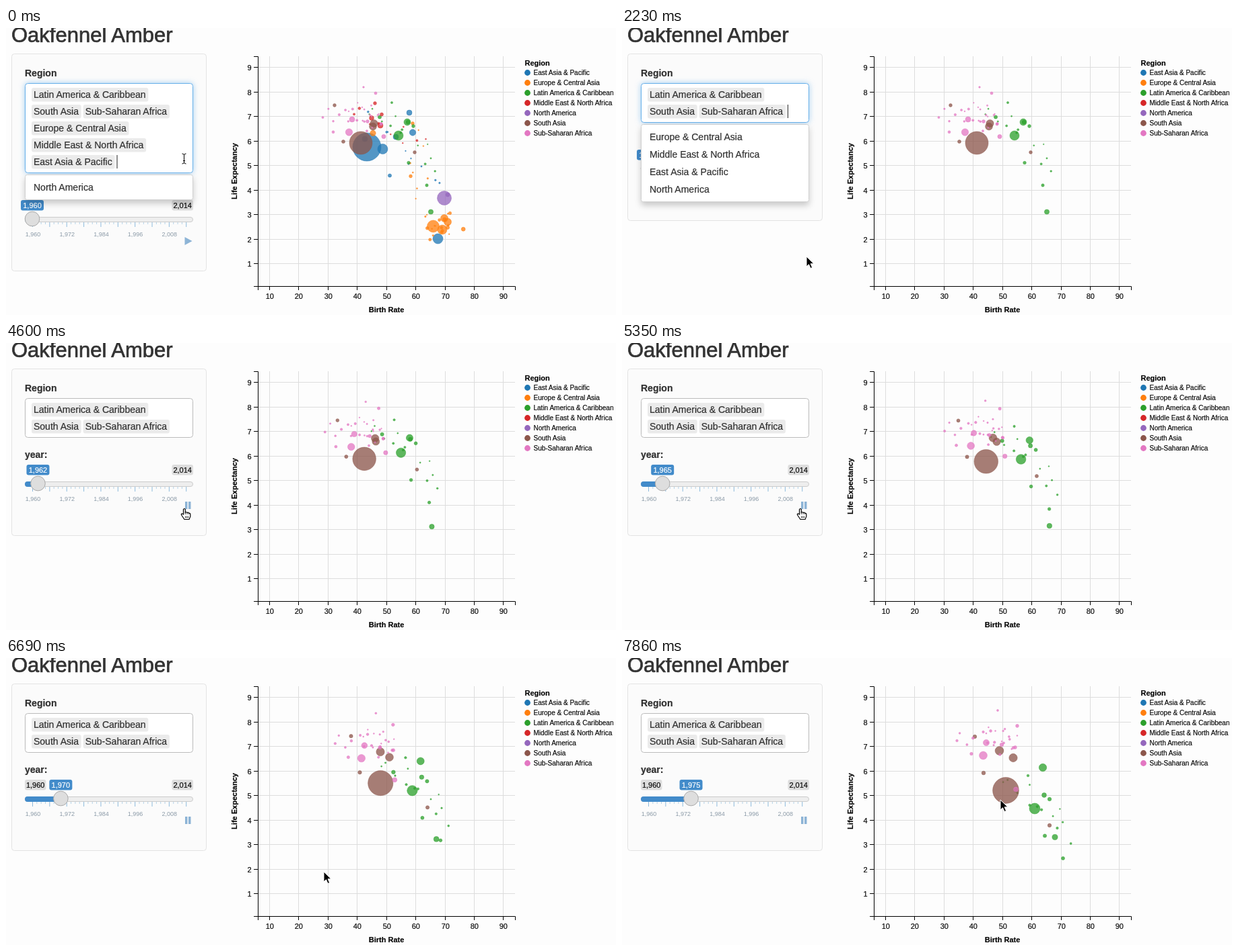
Recreate the animation shown at these times as an HTML page. Size 906x427 px, loop 8000 ms.

```html
<!DOCTYPE html>
<html lang="en">
<head>
<meta charset="utf-8">
<title>Bubble chart</title>
<style>
  html, body { margin: 0; width: 100%; height: 100%; overflow: hidden; background: #fdfdfd; }
  svg { display: block; width: 100%; height: 100%; }
  text { font-family: "Liberation Sans", Arial, Helvetica, sans-serif; stroke: #222; stroke-width: .2; }
  .title { font-size: 31px; fill: #333; stroke: #333; stroke-width: .7; }
  .b { font-weight: bold; }
  .ui { font-size: 14px; fill: #333; }
  .small { font-size: 11px; }
  .legend { font-size: 10px; }
  .year { font-size: 9px; fill: #8c9ba8; stroke: none; }
  .light { fill: #fff; stroke: #fff; }
  .mid { text-anchor: middle; }
  .end { text-anchor: end; }
  .focus { filter: drop-shadow(0 0 4px rgba(102, 175, 233, .6)); }
  .menu { filter: drop-shadow(0 5px 5px rgba(0, 0, 0, .2)); }
  #dots { opacity: 1; fill-opacity: .76; stroke-opacity: .76; stroke-width: .6; }
</style>
</head>
<body>
<svg viewBox="0 0 906 427" preserveAspectRatio="none">
  <g id="plot"></g>
  <g id="dots"></g>
  <text x="8" y="21" class="title">Oakfennel Amber</text>
  <g id="panel"></g>
  <g id="pointer"></g>
</svg>
<script>
const LOOP = 8000, STEP = 148.3, LAST = 53;
const PLAY = 28;                       // step at which the years start to run

// ---------- helpers ----------
const $ = id => document.getElementById(id);
const range = n => [...Array(n).keys()];
const comma = n => n.toLocaleString('en-US');
const rect = (x, y, w, h, fill, rx = 0, more = '') =>
  `<rect x="${x}" y="${y}" width="${w}" height="${h}" rx="${rx}" fill="${fill}" ${more}/>`;
const text = (x, y, s, cls = '', more = '') =>
  `<text x="${x}" y="${y}" class="${cls}" ${more}>${s.replace('&', '&amp;')}</text>`;
const line = (x1, y1, x2, y2, color) =>
  `<path d="M${x1} ${y1}L${x2} ${y2}" stroke="${color}"/>`;
const circle = (x, y, r, more = '') =>
  `<circle cx="${x.toFixed(2)}" cy="${y.toFixed(2)}" r="${r.toFixed(2)}" ${more}/>`;

const pen = document.createElement('canvas').getContext('2d');
pen.font = '14px "Liberation Sans", Arial, Helvetica, sans-serif';

function seeded(seed) {
  return () => {
    seed = (seed * 16807) % 2147483647;
    return seed / 2147483647;
  };
}

// ---------- bubbles ----------
// big: radius, x, y and, where it differs from the region, its own drift
// clouds: count, line from x, y to x, y, spread, largest radius
// gone: step at which the region has left the chart
const regions = [
  { name: 'East Asia & Pacific', color: '#1f77b4', gone: 3,
    big: [[21, 536, 177], [7.5, 559.5, 180], [7.5, 641.5, 313.5], [4, 599, 126], [4.7, 604, 155.5],
          [4, 579, 162], [2.6, 570, 219.5], [4, 533, 165]],
    clouds: [[9, 540, 140, 656, 240, 14, 1.6]] },
  { name: 'Europe & Central Asia', color: '#ff7f0e', gone: 11,
    big: [[9, 634.5, 295], [7, 648, 300], [5.5, 656, 288.5], [5.5, 651, 283], [4.2, 545, 156.5],
          [2.4, 601, 220.5], [2.4, 604, 142]],
    clouds: [[18, 632, 300, 664, 284, 17, 3.2], [8, 610, 150, 620, 275, 14, 1.3]] },
  { name: 'Latin America & Caribbean', color: '#2ca02c', drift: [30, 64],
    big: [[7, 583, 160], [5, 596, 140, 29, 23], [3.6, 631, 273.5, 12, -7], [3, 597, 140],
          [2.3, 598, 200.5], [2.2, 625, 234], [2.4, 605, 146], [2.6, 555, 132.5], [1.6, 573, 111]],
    clouds: [[12, 540, 125, 645, 205, 15, 1.6]] },
  { name: 'Middle East & North Africa', color: '#d62728', gone: 5,
    big: [[3.4, 543, 134], [4, 556, 145], [2.5, 558, 128.5], [2.4, 548, 112]],
    clouds: [[9, 510, 118, 625, 175, 14, 2]] },
  { name: 'North America', color: '#9467bd', gone: 2,
    big: [[10.5, 651, 253], [3, 656, 248]] },
  { name: 'South Asia', color: '#8c564b', drift: [36, 2],
    big: [[17, 527, 171, 43, 26], [5.6, 546.5, 142, 14, -4], [5.4, 545, 146.5], [2.5, 501, 169],
          [2.4, 488, 115], [2.4, 607, 185, 28, 64]] },
  { name: 'Sub-Saharan Africa', color: '#e377c2', drift: [27, -10],
    big: [[4, 514, 136], [5.2, 509.5, 155], [3.1, 561, 161.5, 24, 34], [2.4, 537, 139],
          [2.1, 549, 97, 38, 4], [2.1, 557, 143], [1.6, 470.5, 133], [1.3, 531, 88]],
    clouds: [[22, 490, 140, 555, 130, 23, 2]] }
];

regions.forEach((region, i) => {
  const rnd = seeded(4211 + 97 * i), { drift = [0, 0], big, clouds = [] } = region;
  const spread = s => (rnd() + rnd() - 1) * s * 1.3;
  const small = clouds.flatMap(([n, x1, y1, x2, y2, s, top]) => range(n).map(j => {
    const f = (j + rnd()) / n, pace = 0.7 + 0.6 * rnd();
    return [0.8 + (top - 0.8) * rnd() ** 1.5, x1 + (x2 - x1) * f + spread(s),
            y1 + (y2 - y1) * f + spread(s), ...drift.map(d => d * pace)];
  }));
  region.dots = [...small, ...big.map(d => d.length > 3 ? d : [...d, ...drift])];
});

function drawDots(k) {
  const p = Math.max(0, (k - PLAY) / (LAST - PLAY));
  return regions.map(({ color, dots, gone = Infinity }) => {
    if (k >= gone) return '';
    const fading = k === gone - 1 && k < 10;
    return `<g fill="${color}" stroke="${color}" opacity="${fading ? 0.4 : 1}">` +
      dots.map(([r, x, y, dx, dy]) =>
        circle(x + dx * p, y + dy * p ** 1.4, r * (1 + 0.14 * p))).join('') + '</g>';
  }).join('');
}

// ---------- axes and legend ----------
function drawPlot() {
  const ticks = range(9);
  const xs = ticks.map(i => Math.round(391 + 43.43 * i) + 0.5);
  const ys = ticks.map(i => Math.round(350 - 36.5 * i) + 0.5);
  let s = '';
  xs.forEach(x => s += line(x, 42, x, 384, '#ddd'));
  ys.forEach(y => s += line(374, y, 756, y, '#ddd'));
  ticks.forEach(i => {
    s += line(xs[i], 384, xs[i], 390, '#000') + text(xs[i] + 0.3, 403, `${10 * (i + 1)}`, 'small mid');
    s += line(368, ys[i], 374, ys[i], '#000') + text(364.5, ys[i] + 4, `${i + 1}`, 'small end');
  });
  s += '<path d="M368 42.5H374.5V384.5H368M374.5 390V384.5H756.5V390" fill="none" stroke="#000"/>';
  s += text(565, 423, 'Birth Rate', 'b small mid');
  s += text(0, 0, 'Life Expectancy', 'b small mid', 'transform="translate(343 213) rotate(-90)"');
  s += text(770.5, 56, 'Region', 'b small');
  regions.forEach((r, i) => {
    s += circle(774.5, 66.5 + 15 * i, 4.4, `fill="${r.color}"`);
    s += text(783.5, 70 + 15 * i, r.name, 'legend');
  });
  return s;
}

// ---------- side panel ----------
const choices = [2, 5, 6, 1, 3, 0, 4].map(i => regions[i].name);

// chosen names flow into rows
function layTags(names) {
  let x = 38, row = 0;
  return names.map(name => {
    const w = pen.measureText(name).width + 6;
    if (x + w > 272) { x = 38; row++; }
    const tag = { name, x, row, w };
    x += w + 3;
    return tag;
  });
}

const badge = (x, year, fill, w, cls = '') =>
  rect(x - w / 2, 181, w, 15.5, fill, 3) + text(x, 192.7, comma(year), 'small mid ' + cls);

function drawSlider(k) {
  const year = k > PLAY ? Math.floor(1960.45 + (k - PLAY) * 0.6) : 1960;
  const x = 39 + (year - 1960) * 4.235;
  let s = text(28, 171, 'year:', 'b ui');
  if (year >= 1970) s += badge(43.7, 1960, '#ddd', 31.5);
  s += badge(262.2, 2014, '#ddd', 31.5) + badge(x, year, '#428bca', 34, 'light');
  range(37).forEach(i => {
    const tx = 39.5 + i * 6.34;
    s += line(tx, 213, tx, i % 4 ? 217 : 221, i % 4 ? '#b5d3e8' : '#8fbbdd');
  });
  s += rect(28.5, 206.5, 249, 7, '#eee', 3.5, 'stroke="#ccc"') + rect(28, 206, x - 28, 8, '#428bca', 4);
  s += circle(x, 209, 10.8, 'fill="#dedede" stroke="#aaa"');
  range(5).forEach(i => s += text(40 + 50.7 * i, 235, comma(1960 + 12 * i), 'year mid'));
  const icon = k < 27 ? 'M265.5 236L276.5 242L265.5 248Z' : 'M266 236h3.5v11h-3.5ZM271 236h3.5v11h-3.5Z';
  return s + `<path d="${icon}" fill="#8db4d6"/>`;
}

function drawPanel(k) {
  const count = k < 1 ? 6 : k < 3 ? 5 : k < 11 ? 4 : 3;
  const tags = layTags(choices.slice(0, count)), last = tags[count - 1];
  const shift = 25 * (last.row - 1), bottom = 140.5 + shift, open = k < 18;
  let s = rect(8.5, 38.5, 289, 248 + shift, '#fbfbfb', 4, 'stroke="#e3e3e3"');
  s += text(28, 72, 'Region', 'b ui');
  s += `<g transform="translate(0 ${shift})">${drawSlider(k)}</g>`;
  s += rect(28.5, 82.5, 249, bottom - 82.5, '#fff', 4, open ? 'stroke="#66afe9" class="focus"' : 'stroke="#bbb"');
  tags.forEach(({ name, x, row, w }) =>
    s += rect(x, 89 + 25 * row, w, 20.5, '#ebebeb', 3) + text(x + 3, 104 + 25 * row, name, 'ui'));
  if (!open) return s;

  const options = choices.slice(count), top = bottom + 3;
  s += rect(28.5, top, 249, 26 * options.length + 11, '#fff', 3, 'stroke="#d0d0d0" class="menu"');
  options.forEach((o, i) => s += text(41, top + 23.5 + 26 * i, o, 'ui'));
  const caretOn = k < 8 || k === 11 || k === 12 || k > 14;
  const cx = last.x + last.w + 3.5, cy = 89 + 25 * last.row;
  return caretOn ? s + line(cx, cy, cx, cy + 20, '#222') : s;
}

// ---------- mouse pointer ----------
const shapes = {
  beam: '<path d="M-3 -7.5Q0 -7.5 0 -5.5Q0 -7.5 3 -7.5M0 -6V6M-3 7.5Q0 7.5 0 5.5Q0 7.5 3 7.5M-1.5 3H1.5" fill="none" stroke="#000"/>',
  arrow: '<path d="M0 0V15L3.5 11.7L6 17.5L8.6 16.4L6.1 10.8H11Z" fill="#000" stroke="#fff"/>',
  hand: '<path d="M4.500 9V1.500Q6 -.5 7.300 1.500V6Q9 4.800 10 6.500Q11.800 5.500 12.600 7.200Q14.800 6.800 14.800 9V12L13 16.500H6L2 10.500Q.5 8 2.500 7.800Z" fill="#fff" stroke="#000" stroke-width="1.2"/><path d="M7.300 6V9M10 6.500V9M12.600 7.200V9M7.500 11.500V14.500M9.500 11.500V14.500M11.500 11.500V14.500" stroke="#000" stroke-width=".8"/>'
};
// step, x, y
const path = [[12, 264.5, 194.5], [15, 274, 340], [18, 270, 335], [22, 259, 246],
              [43, 259, 246], [45, 472, 318], [51, 538, 282], [LAST, 562, 211]];

function drawPointer(k) {
  const i = Math.max(1, path.findIndex(([step]) => step >= k));
  const [a, ax, ay] = path[i - 1], [b, bx, by] = path[i];
  const f = Math.max(0, (k - a) / (b - a));
  const kind = k < 13 ? 'beam' : k >= 25 && k < 44 ? 'hand' : 'arrow';
  return `<g transform="translate(${ax + (bx - ax) * f} ${ay + (by - ay) * f})">${shapes[kind]}</g>`;
}

// ---------- clock ----------
let shown = -1;
const start = performance.now();
function tick() {
  const t = (performance.now() - start) % LOOP;
  const k = Math.min(LAST, Math.floor((t + 10) / STEP));
  if (k !== shown) {
    shown = k;
    $('dots').innerHTML = drawDots(k);
    $('panel').innerHTML = drawPanel(k);
    $('pointer').innerHTML = drawPointer(k);
  }
  requestAnimationFrame(tick);
}
$('plot').innerHTML = drawPlot();
tick();
</script>
</body>
</html>
```
